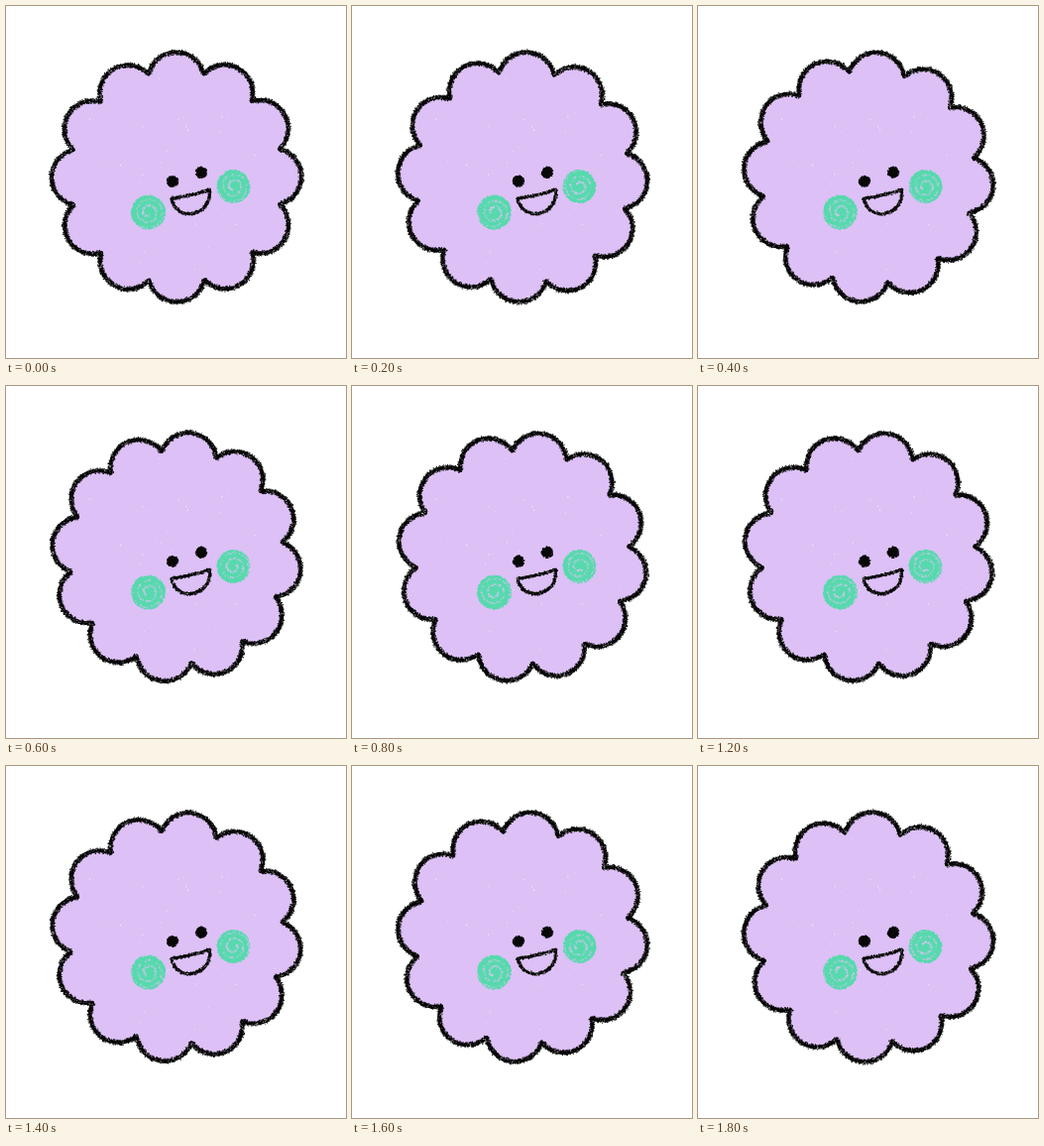
An HTML page with a canvas that plays this animation: 343 px wide and 355 px high, repeating every 2000 ms.

```html
<!DOCTYPE html>
<html lang="en">
<head>
<meta charset="utf-8">
<title>Fluffy smile</title>
<style>
html, body { margin: 0; width: 100%; height: 100%; overflow: hidden; background: #fff; }
canvas { display: block; }
</style>
</head>
<body>
<canvas id="stage" width="343" height="355"></canvas>
<script>
const W = 343, H = 355, TAU = Math.PI * 2, DEG = Math.PI / 180;
const CX = 172, CY = 172.5;
const PETALS = 12, TIP = 126, CREASE = 107.5;
const LILAC = '#dcc0f6', MINT = '#57d9ad', INK = '#080808', CHALK = 'rgba(235,230,240,.6)';
const STEP = 200, POSES = 6, TURN = 2.4 * DEG, START = -15.2 * DEG;

function rng(seed) {
  return () => {
    seed = (seed + 0x6d2b79f5) | 0;
    let t = Math.imul(seed ^ (seed >>> 15), 1 | seed);
    t = (t + Math.imul(t ^ (t >>> 7), 61 | t)) ^ t;
    return ((t ^ (t >>> 14)) >>> 0) / 4294967296;
  };
}

function polar(x, y, r, a) {
  return [x + r * Math.cos(a), y + r * Math.sin(a)];
}

function cubic(a, b, c, d, n = 20) {
  return Array.from({ length: n }, (_, i) => {
    const t = i / n, u = 1 - t;
    return [0, 1].map(k => u*u*u*a[k] + 3*u*u*t*b[k] + 3*u*t*t*c[k] + t*t*t*d[k]);
  });
}

// Ring of circular petals that meet at the creases.
function flower(turn) {
  const half = Math.PI / PETALS;
  const reach = CREASE * Math.sin(half), rise = TIP - CREASE * Math.cos(half);
  const r = (reach * reach + rise * rise) / (2 * rise);
  const sweep = Math.acos((r - rise) / r), n = 36;
  const pts = [];
  for (let p = 0; p < PETALS; p++) {
    const dir = turn + (2 * p + 1) * half;
    const [x, y] = polar(CX, CY, TIP - r, dir);
    for (let i = 0; i <= n; i++) pts.push(polar(x, y, r, dir + sweep * (2 * i / n - 1)));
  }
  return pts;
}

function trace(g, pts) {
  g.beginPath();
  pts.forEach(p => g.lineTo(p[0], p[1]));
  g.closePath();
}

function dot(g, x, y, r) {
  g.beginPath();
  g.arc(x, y, r, 0, TAU);
  g.fill();
}

// Closed crayon line: core stroke with dark and pale grains across its width.
function crayon(g, pts, width, rand) {
  g.strokeStyle = INK;
  g.lineJoin = 'round';
  g.lineWidth = width * 0.6;
  trace(g, pts);
  g.stroke();
  pts.forEach((p, i) => {
    const q = pts[(i + 1) % pts.length];
    const dx = q[0] - p[0], dy = q[1] - p[1], len = Math.hypot(dx, dy);
    if (len < 0.01) return;
    const count = Math.ceil(len * width * 0.8);
    for (let k = 0; k < count; k++) {
      const t = rand(), off = (rand() - 0.5) * (width - 0.8) / len;
      g.fillStyle = rand() < 0.16 ? CHALK : INK;
      dot(g, p[0] + dx * t - dy * off, p[1] + dy * t + dx * off, 0.35 + rand() * 0.4);
    }
  });
}

// Crayon disc: solid middle, rough rim.
function disc(g, x, y, r, color, rand) {
  g.fillStyle = color;
  dot(g, x, y, r - 0.9);
  for (let i = 0; i < r * 12; i++) {
    dot(g, ...polar(x, y, r - 1.3 + rand() * 1.1, rand() * TAU), 0.5 + rand() * 0.4);
  }
}

// Mint disc with pale scrapes along a loose spiral.
function cheek(g, x, y, r, rand) {
  disc(g, x, y, r, MINT, rand);
  g.fillStyle = 'rgba(213,200,242,.6)';
  const turn = rand() * TAU;
  for (let i = 0; i < 230; i++) {
    const t = rand();
    dot(g, ...polar(x, y, r * (0.15 + 0.75 * t) + rand() * 2.2, turn + t * TAU * 2.2), 0.3 + rand() * 0.5);
  }
}

function specks(g, rand) {
  for (let i = 0; i < 70; i++) {
    g.fillStyle = `rgba(255,255,255,${0.25 + rand() * 0.5})`;
    dot(g, ...polar(CX, CY, 108 * Math.sqrt(rand()), rand() * TAU), 0.3 + rand() * 0.5);
  }
}

function mouth(g, rand) {
  const left = [167, 194], right = [205.5, 185], low = [185.5, 209.5];
  crayon(g, [
    ...cubic(left, [180, 192.5], [194, 189.5], right),
    ...cubic(right, [207, 200], [197, 209], low),
    ...cubic(low, [176, 210], [168.5, 203], left)
  ], 4.6, rand);
}

function paint(pose) {
  const layer = document.createElement('canvas');
  layer.width = W;
  layer.height = H;
  const g = layer.getContext('2d'), rand = rng(pose * 97 + 11);
  const edge = flower(START + pose * TURN);
  g.fillStyle = LILAC;
  trace(g, edge);
  g.fill();
  specks(g, rng(5));
  crayon(g, edge, 6.4, rand);
  cheek(g, 143.5, 208, 17.2, rand);
  cheek(g, 229.5, 182, 16.7, rand);
  disc(g, 168, 176.8, 5.9, INK, rand);
  disc(g, 197, 167.7, 5.9, INK, rand);
  mouth(g, rand);
  return layer;
}

const poses = Array.from({ length: POSES }, (_, i) => paint(i));
const ctx = document.getElementById('stage').getContext('2d');

// Sways to the last pose and back.
function draw() {
  const last = POSES - 1;
  const beat = Math.floor(performance.now() / STEP) % (2 * last);
  ctx.fillStyle = '#fff';
  ctx.fillRect(0, 0, W, H);
  ctx.drawImage(poses[last - Math.abs(last - beat)], 0, 0);
  requestAnimationFrame(draw);
}
draw();
</script>
</body>
</html>
```
